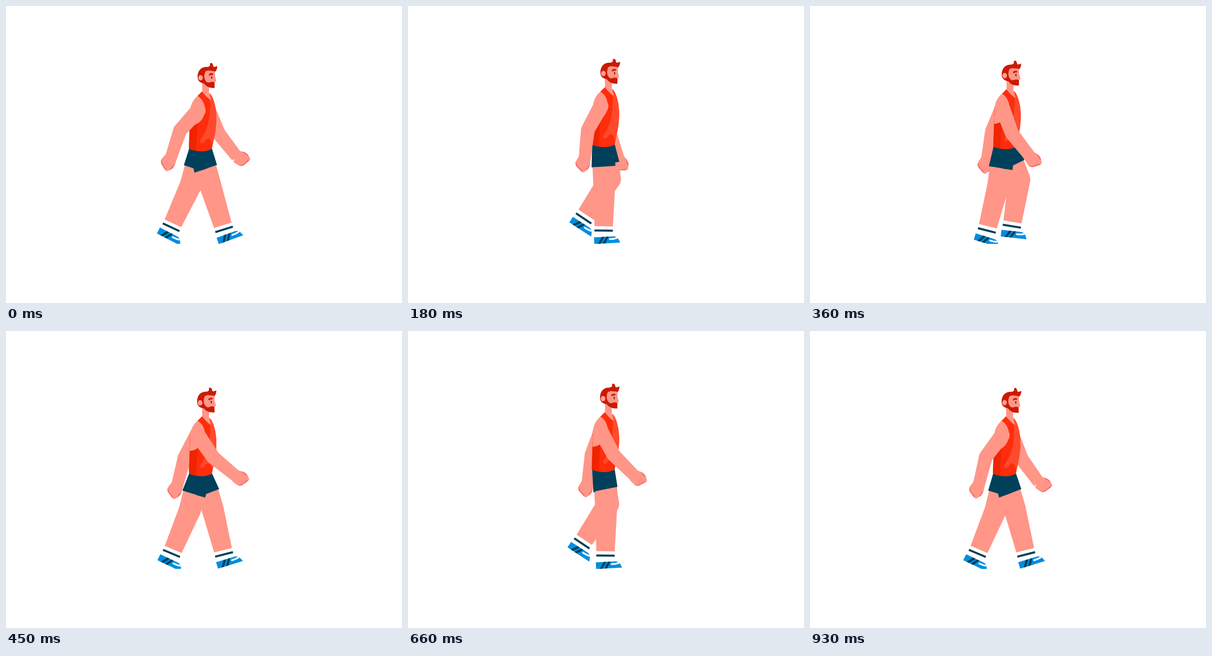
An HTML page with a canvas for the animation above (0.96 s loop, 864x648 px).

```html
<!DOCTYPE html>
<html lang="en">
<head>
<meta charset="utf-8">
<title>Walk cycle</title>
<style>
html, body { margin: 0; width: 100%; height: 100%; overflow: hidden; background: #fff; }
canvas { display: block; }
</style>
</head>
<body>
<canvas id="stage" width="864" height="648"></canvas>
<script>
const ctx = document.getElementById('stage').getContext('2d');
const LOOP = 960, STEP = 30, GROUND = 519, TURN = 2 * Math.PI;
const SKIN = '#ff9688', PINK = '#fa6c6a', HAIR = '#cc1a04', NAVY = '#00405a', BLUE = '#008ee0';
const { sin, cos, max, min, abs } = Math;

const rad = deg => deg * Math.PI / 180;
const phase = (t, shift = 0) => (t - shift) / LOOP * TURN;
const lerp = (a, b, u) => a.map((v, i) => v + (b[i] - v) * u);
// Point at a distance from p; angle 0 hangs down, positive swings forward
const reach = ([x, y], length, deg) => [x + length * sin(rad(deg)), y + length * cos(rad(deg))];

function poly(color, ...pts) {
  ctx.fillStyle = color;
  ctx.beginPath();
  pts.forEach(p => ctx.lineTo(...p));
  ctx.fill();
}

function shape(color, d) {
  ctx.fillStyle = color;
  ctx.fill(new Path2D(d));
}

function ellipse(color, [x, y], rx, ry = rx) {
  ctx.fillStyle = color;
  ctx.beginPath();
  ctx.ellipse(x, y, rx, ry, 0, 0, TURN);
  ctx.fill();
}

function line(color, width, d) {
  ctx.strokeStyle = color;
  ctx.lineWidth = width;
  ctx.lineCap = 'round';
  ctx.stroke(new Path2D(d));
}

function group([x, y], deg, draw) {
  ctx.save();
  ctx.translate(x, y);
  ctx.rotate(rad(deg));
  draw();
  ctx.restore();
}

// Left and right end of a cut through a limb that hangs at the given angle
const across = (p, r, deg) => [reach(p, -r, deg + 90), reach(p, r, deg + 90)];

function taper(a, ra, aDeg, b, rb, bDeg) {
  const [aLeft, aRight] = across(a, ra, aDeg), [bLeft, bRight] = across(b, rb, bDeg);
  poly(SKIN, aLeft, aRight, bRight, bLeft);
}

function limb(a, ra, b, rb, deg) {
  ellipse(SKIN, a, ra);
  taper(a, ra, deg, b, rb, deg);
}

function drawArm(shoulder, upper, fore, curl) {
  const elbow = reach(shoulder, 58.5, upper), wrist = reach(elbow, 64, fore);
  limb(shoulder, 16.5, elbow, 15, upper);
  limb(elbow, 15, wrist, 13, fore);
  group(wrist, -fore - curl * max(0, fore), () => {
    shape(SKIN, 'M-13-5L-18 7Q-20 12-16 18L-4 28Q1 32 4 27L9 23Q13 18 13 9L13-5Z');
    shape(PINK, 'M-18.5 9Q-19 14-16 18L-4 28L-2 25L-10 20Q-15 16-18.5 9Z');
    shape(PINK, 'M13 8Q13 19 6 24Q7 19 9 16Z');
  });
}

function nearArm(t, place) {
  const p = phase(t, 65);
  const upper = -42 * cos(p) + 3 * sin(p) - 4 * cos(2 * p);
  drawArm(place(419, 228), upper, .9 * upper + 19.5, .5);
}

function farArm(t, place) {
  const p = phase(t, 20);
  const upper = -6.5 + 27 * cos(p) + 4 * cos(2 * p);
  drawArm(place(430 + 25 * sin(rad(upper)), 225), upper, upper + 14, 1.1);
}

function drawShoe() {
  shape(BLUE, 'M0 0H44C50 1 55 8 56.5 14.5H0Z');
  poly(NAVY, [8, 14.5], [14, 14.5], [23, 0], [17, 0]);
  poly(NAVY, [18, 14.5], [24, 14.5], [32, 0], [27, 0]);
  line('#fff', 3.8, 'M34.5 5.8Q43 6 49 4.3');
}

function drawLeg(t, dx, place) {
  const p = phase(t), hip = place(424 + dx, 305);
  const thigh = 4.5 + 14.5 * cos(p) - 8 * sin(p) - 4.2 * cos(2 * p) - 2.2 * sin(2 * p)
    + .5 * cos(3 * p) + 2 * sin(3 * p);
  const shin = -11.7 + 18.2 * cos(p) + 12.8 * sin(p) + 7.9 * cos(2 * p)
    + 3 * cos(3 * p) - 1.2 * sin(3 * p);
  // The sole flattens as the body passes over it
  const flat = 7 * max(0, cos(phase(t, 215))) ** 16;
  const foot = -shin + 3 * sin(phase(t, 150)) - flat;

  const knee = reach(hip, 87 + 4.5 * sin(p), thigh), ankle = reach(knee, 94, shin);
  const hem = lerp(hip, knee, .6), hemAngle = 1.25 * thigh;
  taper(hem, 24, hemAngle, knee, 24, thigh);
  limb(knee, 24, ankle, 20, shin);

  group(ankle, -shin, () => {
    ctx.fillStyle = '#fff';
    ctx.fillRect(-20.5, 0, 41, 22);
    ctx.fillStyle = NAVY;
    ctx.fillRect(-20, 7, 40, 4.5);
  });
  group(reach(ankle, 13 + 2 * sin(p), shin), foot, () => {
    ctx.translate(-21.5, 8);
    drawShoe();
  });
  const [hemLeft, hemRight] = across(hem, 26, hemAngle);
  poly(NAVY, place(400, 310), place(449, 310), hemRight, hemLeft);
}

function drawTorso() {
  shape('#ff2d0b', 'M428 186L446 203L444 190C453 198 459 222 459 244C459 270 453 292 449 312Q426 323 399 311L402 225L418 196Z');
  shape('#f02400', 'M402 225L419 255Q415 285 415 316Q406 315 399 311Z');
  shape('#ff4a2d', 'M444 190C453 198 459 222 459 244C459 268 454 290 450 307C449 296 446 289 441 289C435 289 434 298 428 299C423 299 423 293 427 288C439 271 447 245 445 202Z');
  shape(SKIN, 'M428 160H443V189L447.5 205Q442 204 428 187Z');
  shape(SKIN, 'M418 196C428 202 434 213 434 226C434 246 420 260 401 262L402 228C403 212 410 203 418 196Z');
}

function drawHead(eye) {
  shape(HAIR, 'M418 155C418 142 425 133 437 133C443 133 446 131 445 127C445 123.5 450 123.5 451 127L453 133Q457 133 461 131Q461 139 456 144L455 179C444 179 437 176 432 169C424 168 418 163 418 155Z');
  shape(SKIN, 'M435 143C440 139.5 445 141 449 141.5Q453 141.5 456 143L456 153L458.8 164Q458 166 455 166.5L450 165.5C445 165 443 169 438 166C432 161 431 152 435 143Z');
  ellipse('#ffa194', [424.5, 156.5], 5, 5.8);
  line(HAIR, 3.8, 'M444.5 150Q447 147.5 450.3 148.7');
  ellipse('#5c1711', [449, 156], 1.2, 1.2 + 1.8 * eye);
}

function draw(t) {
  const lift = sin(phase(t, -6)) ** 2;
  const place = (x, y) => [x + 2 * lift, y - 10.5 * lift];
  const nod = -3 * max(0, -cos(phase(t, 40)));
  const eye = min(1, abs(t - 90) / 75);

  ctx.fillStyle = '#fff';
  ctx.fillRect(0, 0, 864, 648);
  ctx.save();
  ctx.beginPath();
  ctx.rect(0, 0, 864, GROUND);
  ctx.clip();

  farArm(t, place);
  drawLeg(t + LOOP / 2, 2, place);
  drawLeg(t, -2, place);
  group(place(0, 0), 0, drawTorso);
  nearArm(t, place);
  group(place(432, 178), nod, () => {
    ctx.translate(-432, -178);
    drawHead(eye);
  });
  ctx.restore();
}

function tick() {
  draw(Math.floor(performance.now() % LOOP / STEP) * STEP);
  requestAnimationFrame(tick);
}
tick();
</script>
</body>
</html>
```
